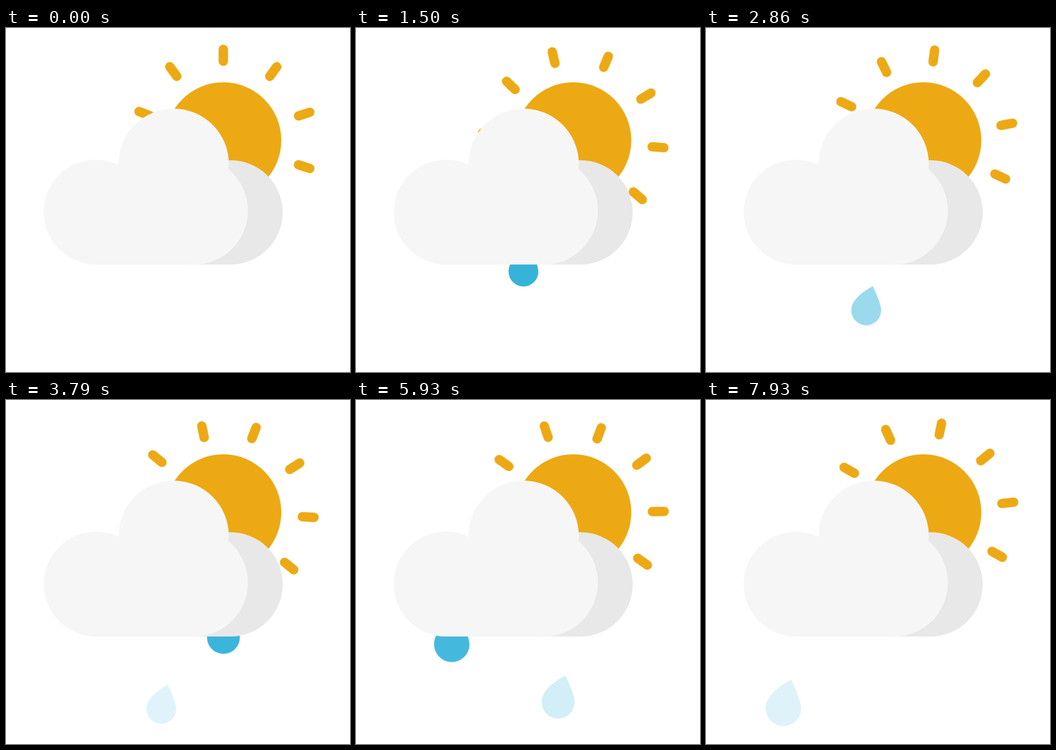
An HTML page that plays this animation: 640 by 640 pixels, repeating every 8000 ms.

```html
<!DOCTYPE html>
<html lang="en">
<head>
<meta charset="utf-8">
<title>Sun, cloud and rain</title>
<style>
  html, body { margin: 0; width: 100%; height: 100%; overflow: hidden; background: #fff; }
  svg { display: block; width: 100%; height: 100%; }

  .sun { fill: #eca914; }
  .rays {
    stroke: #eca914; stroke-width: 17.5; stroke-linecap: round;
    animation: spin 8s linear infinite;
  }
  .back { fill: #e8e8e8; }
  .front { fill: #f6f6f6; }

  .drop { fill: #30b1d9; animation: 8s linear infinite; }
  .middle { animation-name: fall-middle, fade-middle; }
  .right { animation-name: fall-right, fade-right; }
  .left { animation-name: fall-left, fade-left; }

  @keyframes spin { from { transform: rotate(0deg); } to { transform: rotate(120.64deg); } }

  @keyframes fall-middle {
    from { transform: translate(326.3px, 372.9px) scale(27.75); }
    to { transform: translate(247.5px, 797.6px) scale(27.75); }
  }
  @keyframes fall-right {
    from { transform: translate(454.9px, 227.8px) scale(30.6); }
    to { transform: translate(348.5px, 677.8px) scale(30.6); }
  }
  @keyframes fall-left {
    from { transform: translate(279.6px, 100.3px) scale(33); }
    to { transform: translate(142.8px, 577.1px) scale(33); }
  }

  @keyframes fade-middle { 0%, 17.6% { opacity: 1; } 52.7%, 100% { opacity: 0; } }
  @keyframes fade-right { 0%, 45.4% { opacity: 1; } 82.2%, 100% { opacity: 0; } }
  @keyframes fade-left { 0%, 70.6% { opacity: 1; } 100% { opacity: .133; } }
</style>
</head>
<body>
<svg viewBox="0 0 640 640">
  <defs>
    <path id="ray" d="M0-169.25V-147.25"/>
    <path id="drop" d="M.44-1.6C.75-.95 1-.3 1 .04A1 1 0 0 1-1 0C-1-.7-.2-1.25 .44-1.6Z"/>
    <!-- Drops only show once they are behind the cloud base or below it -->
    <clipPath id="below"><rect y="400" width="640" height="240"/></clipPath>
  </defs>

  <g transform="translate(404.2 209)">
    <g class="rays">
      <use href="#ray"/>
      <use href="#ray" transform="rotate(36)"/>
      <use href="#ray" transform="rotate(72)"/>
      <use href="#ray" transform="rotate(108)"/>
      <use href="#ray" transform="rotate(144)"/>
      <use href="#ray" transform="rotate(180)"/>
      <use href="#ray" transform="rotate(216)"/>
      <use href="#ray" transform="rotate(252)"/>
      <!-- This ray sits slightly inward and tilted -->
      <use href="#ray" transform="rotate(-71.3) translate(0 3.6) rotate(2.6 0 -158.25)"/>
      <use href="#ray" transform="rotate(324)"/>
    </g>
    <circle class="sun" r="108"/>
  </g>

  <g clip-path="url(#below)">
    <use class="drop middle" href="#drop"/>
    <use class="drop right" href="#drop"/>
    <use class="drop left" href="#drop"/>
  </g>

  <g class="back">
    <circle cx="417.8" cy="343" r="97"/>
    <rect x="340" y="343" width="78" height="97"/>
  </g>
  <g class="front">
    <circle cx="167.5" cy="342.5" r="97.5"/>
    <circle cx="312" cy="252.5" r="102.5"/>
    <circle cx="349.3" cy="339.7" r="100.7"/>
    <path d="M167.5 440V300L209.6 254H312L350 300V440Z"/>
  </g>
</svg>
</body>
</html>
```
